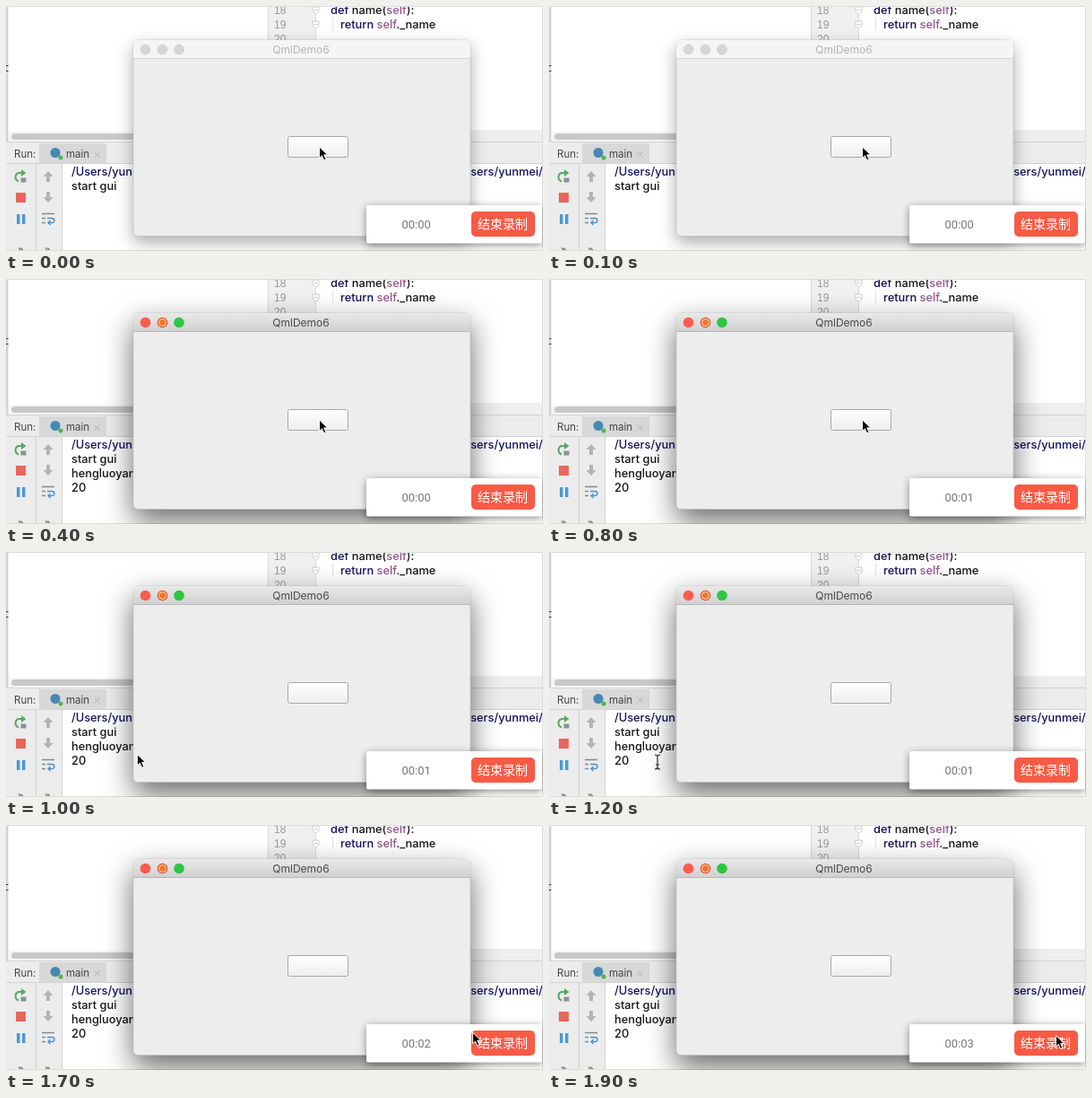
These frames come from a looping animation (599 by 273 pixels, 2 s). An HTML page:

```html
<!DOCTYPE html>
<html lang="en">
<head>
<meta charset="utf-8">
<title>QmlDemo6</title>
<style>
  html, body { margin: 0; width: 100%; height: 100%; overflow: hidden; background: #fff; }
  svg { display: block; width: 599px; height: 273px; }
  text { white-space: pre; }
  .code { font: 500 12.8px Inter, sans-serif; fill: #151515; }
  .ui { font: 12px Inter, sans-serif; fill: #444; }
  .panel { font-size: 11.5px; }
  .num { font: 12px "Liberation Sans", Arial, sans-serif; fill: #999; }
  .key { fill: #10105c; }
  .self { fill: #94558d; }
  #window { filter: drop-shadow(0 7px 9px rgba(0,0,0,.32)); }
  #window.active { filter: drop-shadow(0 13px 16px rgba(0,0,0,.58)); }
  #window .lights { display: none; }
  #window.active .lights { display: inline; }
  #titlebar { fill: #f5f5f5; }
  .active #titlebar { fill: url(#barFill); }
  #barEdge { stroke: #d2d2d2; }
  .active #barEdge { stroke: #b8b8b8; }
  #title { fill: #b4b4b4; }
  .active #title { fill: #484848; }
  #recorder { filter: drop-shadow(0 2px 4px rgba(0,0,0,.45)); }
</style>
</head>
<body>
<svg viewBox="0 0 599 273">
  <defs>
    <linearGradient id="barFill" x2="0" y2="1">
      <stop stop-color="#e9e9e9"/><stop offset="1" stop-color="#d0d0d0"/>
    </linearGradient>
    <linearGradient id="buttonFill" x2="0" y2="1">
      <stop stop-color="#fff"/><stop offset="1" stop-color="#eee"/>
    </linearGradient>
    <path id="fold" d="M-3.5-4h7v5l-3.5 3.5-3.5-3.5zM-2-.5h4" fill="#fff" stroke="#cdcdcd"/>
    <path id="upArrow" d="M0-6 5.5 0H2v6h-4V0h-3.5z" fill="#b3b3b3"/>
  </defs>

  <!-- Editor -->
  <rect width="599" height="273" fill="#fff"/>
  <rect width="2.5" height="151" fill="#d3d3d3"/>
  <path d="M0 66.5h2.5M0 72.5h2.5" stroke="#333"/>
  <rect x="293" width="53" height="140" fill="#f0f0f0"/>
  <path d="M292.5 0v140M345.5 0v140" stroke="#dadada"/>
  <use href="#fold" x="345.5" y="5"/>
  <use href="#fold" x="345.5" y="21"/>
  <g class="num">
    <text x="299" y="9">18</text><text x="299" y="25">19</text><text x="299" y="41">20</text>
  </g>
  <path d="M364.5 13v14" stroke="#e2e2e2"/>
  <text class="code" x="362" y="9"><tspan class="key">def</tspan> name(<tspan class="self">self</tspan>):</text>
  <text class="code" x="373" y="25"><tspan class="key">return</tspan> <tspan class="self">self</tspan>._name</text>
  <rect x="3" y="140" width="290" height="11" fill="#f6f6f6"/>
  <rect x="6" y="142" width="290" height="7" rx="3.5" fill="#c8c8c8"/>
  <rect x="293" y="138" width="306" height="13" fill="#eee"/>

  <!-- Run panel -->
  <rect y="151" width="599" height="25" fill="#ececec"/>
  <rect x="37" y="153" width="75" height="22" fill="#d8d8d8"/>
  <path d="M0 151.5h599M0 175.5h599" stroke="#d2d2d2"/>
  <text class="ui panel" x="9" y="169">Run:</text>
  <circle cx="55" cy="163.5" r="5.5" fill="#4688b4"/>
  <circle cx="61" cy="169" r="2.5" fill="#4db848"/>
  <text class="ui panel" x="67" y="169">main</text>
  <path d="M98.5 162.5l6 6m0-6l-6 6" stroke="#b0b0b0"/>
  <rect y="176" width="62" height="97" fill="#ececec"/>
  <path d="M33.5 176v97M62.5 176v97" stroke="#d0d0d0"/>
  <path d="M14 195.5a5 5 0 0 1 0-9.5h4" fill="none" stroke="#59a869" stroke-width="2"/>
  <path d="M17 182l5.5 4-5.5 4z" fill="#59a869"/>
  <path d="M16.5 191.5h6v5h-6z" fill="#8b9296"/>
  <rect x="11" y="208" width="11" height="11" fill="#e9665c"/>
  <path d="M12 232h3.5v11H12zM18 232h3.5v11H18z" fill="#4a99d4"/>
  <use href="#upArrow" x="47" y="190"/>
  <use href="#upArrow" transform="translate(47 213) rotate(180)"/>
  <path d="M40 231.5h14M40 236.5h4M40 241.5h4" stroke="#818a91" stroke-width="1.3"/>
  <path d="M46 236.5h5q3 0 3 2.5t-3 2.5h-4m2.5-2.5-2.5 2.5 2.5 2.5" fill="none" stroke="#4c8fc4" stroke-width="1.3"/>
  <g class="ui"><text x="13" y="276">»</text><text x="43" y="276">»</text></g>

  <!-- Console -->
  <g class="code">
    <text class="key" x="73" y="189">/Users/yunmei/</text>
    <text class="key" x="504" y="189">/Users/yunmei/D</text>
    <text x="73" y="205">start gui</text>
    <g id="output"><text x="73" y="221">hengluoyan</text><text x="73" y="237">20</text></g>
  </g>
  <path d="M0 .5h598.5v272H0" fill="none" stroke="#dcdcdc"/>

  <!-- Application window -->
  <g id="window">
    <rect x="142" y="38" width="376" height="218.5" rx="5" fill="#ededed" stroke="#b9b9b9" stroke-width=".6"/>
    <path id="titlebar" d="M142 58.5V43q0-5 5-5h366q5 0 5 5v15.5z"/>
    <path id="barEdge" d="M142 58.5h376"/>
    <g fill="#d6d6d6" stroke="#c9c9c9" stroke-width=".7">
      <circle cx="155.5" cy="48.5" r="5.4"/><circle cx="174.5" cy="48.5" r="5.4"/><circle cx="193" cy="48.5" r="5.4"/>
    </g>
    <g class="lights">
      <circle cx="155.5" cy="48.5" r="5.8" fill="#fb5b4f"/>
      <circle cx="174.5" cy="48.5" r="5.8" fill="#ee5426"/>
      <circle cx="174.5" cy="48.5" r="4" fill="#f5722b" stroke="#ffe6c8"/>
      <circle cx="193" cy="48.5" r="5.8" fill="#2dc643"/>
    </g>
    <text id="title" class="ui" x="329" y="53" text-anchor="middle">QmlDemo6</text>
    <rect x="314.5" y="145.5" width="67" height="23" rx="2" fill="url(#buttonFill)" stroke="#a8a8a8"/>
  </g>

  <!-- Recorder -->
  <g id="recorder"><rect x="402" y="222" width="196" height="42.5" rx="2" fill="#fff"/></g>
  <text id="timer" x="441.5" y="248" font-family="Roboto, sans-serif" font-size="13" fill="#777"></text>
  <rect x="519" y="229" width="71" height="28" rx="5" fill="#f75b46"/>
  <text x="526" y="248" font-family="'Noto Sans CJK SC', 'Noto Sans CJK', sans-serif" font-size="14" fill="#fff">结束录制</text>

  <!-- Pointer -->
  <circle id="click" cx="349.5" cy="157.5" r="20.5" fill="none" stroke="#000" stroke-width="1.5"/>
  <path id="arrow" d="M0 0v12.5l2.9-2.7 2.3 5.1 2.3-1-2.3-5h4z" fill="#000" stroke="#fff" stroke-width="1"/>
  <path id="beam" d="M-3-8q3 0 3 2.5V6q0 2-3 2M3-8q-3 0-3 2.5V6q0 2 3 2M-2 3h4" fill="none" stroke="#222" stroke-width="1.1"/>
</svg>
<script>
  const $ = id => document.getElementById(id);
  const show = (id, on) => $(id).style.display = on ? "" : "none";
  const LOOP = 2000, STEP = 100, PRESS = 200, RELEASE = 300;
  const ticks = [700, 1300, 1800];

  // Pointer stops: time, x, y
  const stops = [[0, 349.5, 157], [800, 349.5, 157], [1100, 121, 234], [1400, 121, 234],
                 [1500, 161, 204.5], [1800, 565.5, 234.5], [LOOP, 565.5, 234.5]];

  function pointerAt(t) {
    const i = stops.findIndex(s => s[0] > t);
    const [t0, x0, y0] = stops[i - 1], [t1, x1, y1] = stops[i];
    const u = (t - t0) / (t1 - t0), k = u * (2 - u);
    return [x0 + (x1 - x0) * k, y0 + (y1 - y0) * k];
  }

  function draw(now) {
    const t = Math.floor(now % LOOP / STEP) * STEP;
    const [x, y] = pointerAt(t);
    const overConsole = x < 142 && y > 176;
    $("window").classList.toggle("active", t >= PRESS);
    show("click", t >= PRESS && t < RELEASE);
    show("output", t >= RELEASE);
    show("arrow", !overConsole);
    show("beam", overConsole);
    for (const id of ["arrow", "beam"]) $(id).setAttribute("transform", `translate(${x} ${y})`);
    $("timer").textContent = "00:0" + ticks.filter(s => t >= s).length;
  }

  const start = performance.now();
  function frame() {
    draw(performance.now() - start);
    requestAnimationFrame(frame);
  }
  frame();
</script>
</body>
</html>
```
